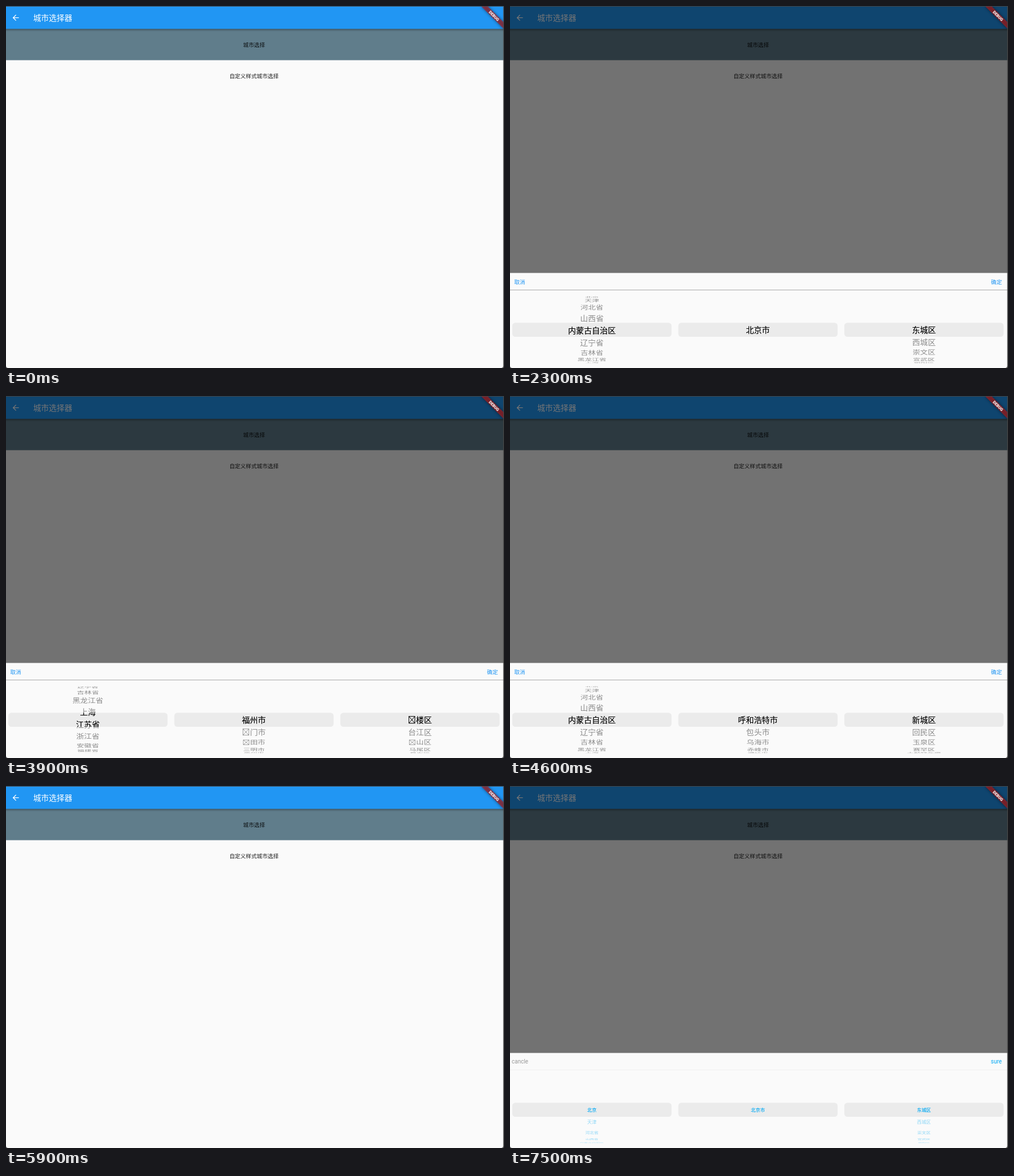
Animation, 877 px wide and 638 px high, one loop 8 s. Source, as an HTML page with a canvas:

```html
<!DOCTYPE html>
<html lang="zh-CN">
<head>
<meta charset="utf-8">
<title>城市选择器</title>
<style>
  html, body { margin: 0; width: 100%; height: 100%; overflow: hidden; background: #fafafa; }
  canvas { display: block; }
</style>
</head>
<body>
<canvas id="stage" width="877" height="638"></canvas>
<script>
const W = 877, H = 638, LOOP = 8000, STEP = 100;
const FONT = 'Roboto, "Noto Sans CJK SC", "Noto Sans CJK", "Noto Sans", sans-serif';
const ctx = document.getElementById('stage').getContext('2d');

const provinces = ('北京 天津 河北省 山西省 内蒙古自治区 辽宁省 吉林省 黑龙江省 上海 江苏省 ' +
  '浙江省 安徽省 福建省 江西省 山东省 河南省 湖北省 湖南省').split(' ');
// City and district lists; □ stands for a glyph missing from the font
const areas = {
  beijing: ['北京市', '东城区 西城区 崇文区 宣武区 朝阳区'],
  fujian: ['福州市 □门市 □田市 三明市 泉州市', '□楼区 台江区 □山区 马尾区 晋安区'],
  neimenggu: ['呼和浩特市 包头市 乌海市 赤峰市 通辽市', '新城区 回民区 玉泉区 赛罕区 土默特左旗']
};

// [time, sheet opening, barrier strength]
const sheetSteps = [
  [0, 0, 0], [500, .991, 1], [600, 1, 1],
  [5700, .8, .8], [5800, .25, .3], [5900, 0, 0],
  [7300, .6, .45], [7400, .97, .9], [7500, 1, 1]
];

const plain = {
  size: 14, color: '#000', divider: '#aaa', blue: '#2196f3',
  left: ['取消', 7.5, 9.6, '#2196f3'], right: ['确定', 866.3, 9.6, '#2196f3'], labelY: 16.2
};
const custom = {
  size: 8.2, color: '#03a9f4', divider: '#f0f0f0',
  left: ['cancle', 3, 10, '#999'], right: ['sure', 866, 10, '#03a9f4'], labelY: 15.2
};

const clamp = v => Math.max(0, Math.min(1, v));
const glide = (t, from, to) => 1 - (1 - clamp((t - from) / (to - from))) ** 3;

function box(x, y, w, h, color) {
  ctx.fillStyle = color;
  ctx.fillRect(x, y, w, h);
}

// y is the middle of the line
function text(str, x, y, size, color, align = 'center', weight = 400) {
  ctx.font = `${weight} ${size}px ${FONT}`;
  ctx.textAlign = align;
  ctx.fillStyle = color;
  ctx.fillText(str, x, y + size * .37);
}

function page() {
  box(0, 0, W, H, '#fafafa');
  box(0, 40, W, 55.5, '#607d8b');
  const shade = ctx.createLinearGradient(0, 40, 0, 45);
  shade.addColorStop(0, 'rgba(0,0,0,.32)');
  shade.addColorStop(1, 'rgba(0,0,0,0)');
  box(0, 40, W, 5, shade);
  box(0, 1, W, 39.3, '#2196f3');

  ctx.save();
  ctx.translate(8.9, 12.4);
  ctx.scale(.686, .686);
  ctx.fillStyle = '#fff';
  ctx.fill(new Path2D('M20 11H7.83l5.59-5.59L12 4l-8 8 8 8 1.41-1.41L7.83 13H20z'));
  ctx.restore();

  text('城市选择器', 48, 21.3, 13.72, '#fff', 'left', 500);
  text('城市选择', 436.8, 68.5, 9.6, 'rgba(0,0,0,.87)');
  text('自定义样式城市选择', 436.8, 123.5, 9.65, 'rgba(0,0,0,.87)');
}

function label(str, size, color) {
  text(str.replace('□', '\u3000'), 0, 0, size, color);
  if (!str.includes('□')) return;
  const x = -str.length * size / 2 + 1.5, w = 10.5, h = 12;
  ctx.strokeStyle = color;
  ctx.lineWidth = .9;
  ctx.beginPath();
  ctx.rect(x, -h / 2, w, h);
  ctx.moveTo(x, -h / 2);
  ctx.lineTo(x + w, h / 2);
  ctx.moveTo(x + w, -h / 2);
  ctx.lineTo(x, h / 2);
  ctx.stroke();
}

// Items sit on a cylinder seen in perspective
function wheel(items, pos, cx, cy, style) {
  const R = 71, depth = .24, angle = .312;
  items.forEach((item, i) => {
    const a = (i - pos) * angle;
    if (Math.abs(a) > 1.5) return;
    const sin = Math.sin(a), cos = Math.cos(a);
    const near = 1 / (1 + depth * (1 - cos));
    const flat = cos * near - depth * (sin * near) ** 2;
    if (flat <= 0) return;
    ctx.save();
    ctx.translate(cx, cy + R * sin * near);
    ctx.scale(near, flat);
    label(item, style.size, style.color);
    ctx.restore();
  });
}

function columns(lists, pos, cy, style) {
  lists.forEach((items, i) => {
    const x = 4 + 292.4 * i, cx = x + 140.2, top = cy - 12.5;
    ctx.beginPath();
    ctx.roundRect(x, top, 280.5, 24.8, 5.5);
    ctx.fillStyle = '#ebebeb';
    ctx.fill();
    const scroll = i ? 0 : pos;
    ctx.save();
    ctx.globalAlpha = .447;
    wheel(items, scroll, cx, cy, style);
    ctx.globalAlpha = 1;
    ctx.beginPath();
    ctx.rect(x, top, 280.5, 24.8);
    ctx.clip();
    wheel(items, scroll, cx, cy, style);
    ctx.restore();
  });
}

function spinner(cx, cy) {
  ctx.save();
  ctx.translate(cx, cy);
  for (let i = 0; i < 8; i++) {
    ctx.fillStyle = `rgba(60,60,68,${.18 + Math.max(0, i - 3) * .1})`;
    ctx.beginPath();
    ctx.roundRect(-.7, 2.3, 1.4, 4.6, .7);
    ctx.fill();
    ctx.rotate(Math.PI / 4);
  }
  ctx.restore();
}

function sheet(t, open) {
  const top = H - 167.5 * open;
  const style = t < 7000 ? plain : custom;
  box(0, top, W, H - top, '#fafafa');
  box(0, Math.round(top + 29.5), W, 1, style.divider);
  for (const [side, [str, x, size, color]] of [['left', style.left], ['right', style.right]])
    text(str, x, top + style.labelY, size, color, side);

  if (t >= 7000 && t < 7500) return spinner(436.5, top + 100);
  const scrolled = style === plain;
  const pos = scrolled ? 12 * glide(t, 2200, 3000) - 8 * glide(t, 3800, 4400) : 0;
  const area = !scrolled || t < 3000 ? areas.beijing : t < 4300 ? areas.fujian : areas.neimenggu;
  columns([provinces, ...area.map(s => s.split(' '))], pos, top + 100.2, style);
}

function ribbon() {
  ctx.save();
  ctx.beginPath();
  ctx.rect(0, 1, 876, H);
  ctx.clip();
  ctx.translate(876, 1);
  ctx.rotate(Math.PI / 4);
  ctx.filter = 'blur(2.5px)';
  box(-27.4, 19.2, 54.8, 8.2, 'rgba(0,0,0,.5)');
  ctx.filter = 'none';
  box(-40, 19.2, 80, 8.2, 'rgba(183,28,28,.627)');
  text('DEBUG', 0, 23.2, 7, '#fff', 'center', 900);
  ctx.restore();
}

function windowEdge() {
  ctx.beginPath();
  ctx.rect(0, 0, W, H);
  ctx.roundRect(0, 1, 875.7, 637, [0, 0, 4, 4]);
  ctx.fillStyle = '#444';
  ctx.fill('evenodd');
}

function draw(now) {
  const t = Math.floor(now % LOOP / STEP) * STEP;
  const [, open, dim] = sheetSteps.findLast(s => s[0] <= t);
  page();
  if (dim) box(0, 0, W, H, `rgba(0,0,0,${.54 * dim})`);
  if (open) sheet(t, open);
  ribbon();
  windowEdge();
}

let start;
function tick(now) {
  start ??= now;
  draw(now - start);
  requestAnimationFrame(tick);
}
requestAnimationFrame(tick);
</script>
</body>
</html>
```
